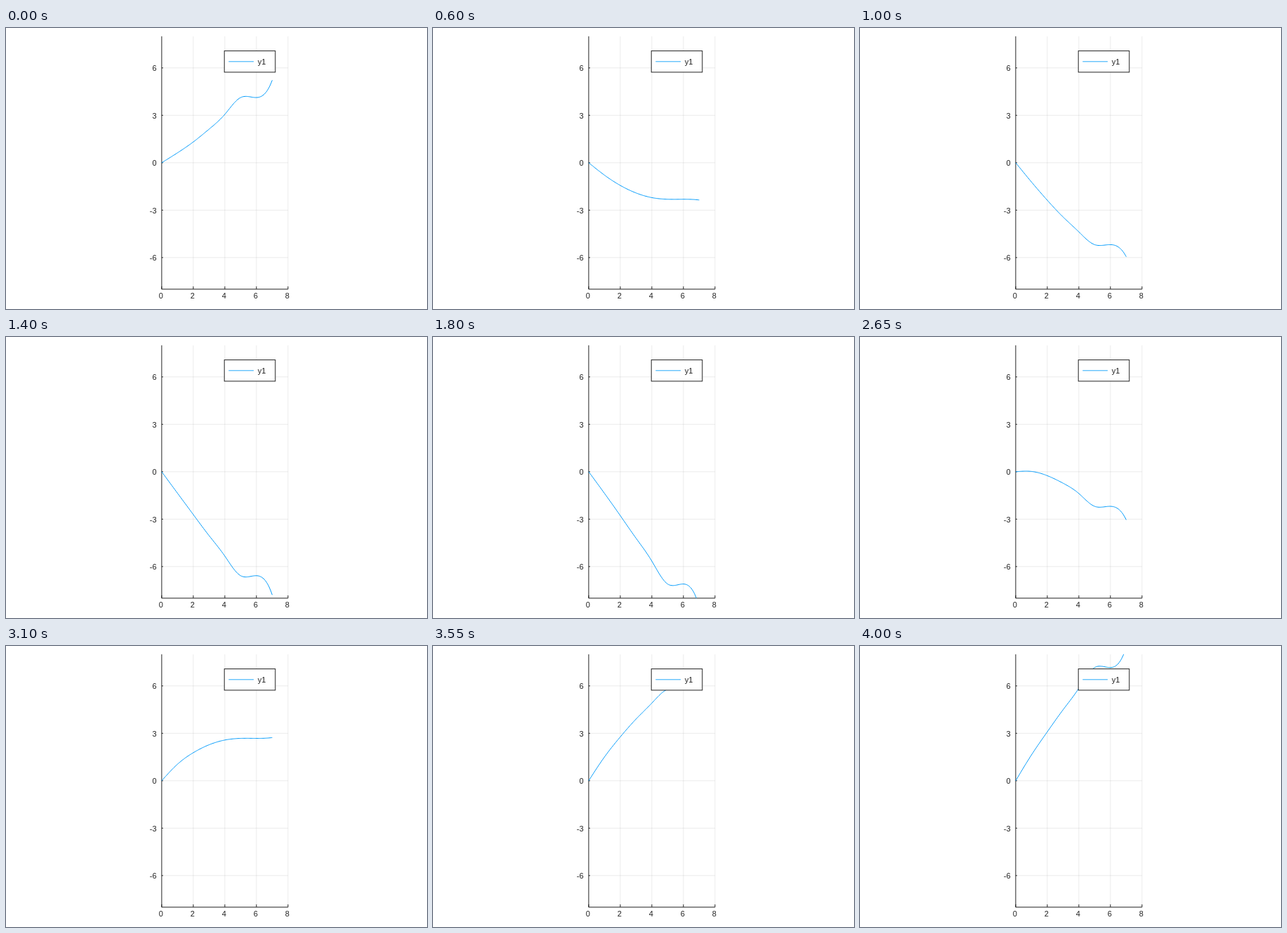
An HTML page that plays this animation: 600 by 400 pixels, repeating every 4050 ms.

```html
<!DOCTYPE html>
<html lang="en">
<head>
<meta charset="utf-8">
<title>Line plot</title>
<style>
  html, body { margin: 0; width: 100%; height: 100%; overflow: hidden; background: #fff; }
  svg { display: block; width: 600px; height: 400px; }
  text { font: 11px "Liberation Sans", Arial, sans-serif; fill: #222; }
  .grid { stroke: #000; stroke-opacity: .1; stroke-width: .8; }
  .axis { stroke: #222; stroke-width: 1; }
  .series { stroke: #009afa; stroke-width: 1; fill: none; stroke-linejoin: round; }
</style>
</head>
<body>
<svg viewBox="0 0 600 400">
  <clipPath id="area"><rect x="221" y="11.8" width="181" height="360"/></clipPath>
  <g id="grid"></g>
  <g id="axes"></g>
  <path id="curve" class="series" clip-path="url(#area)"/>
  <rect x="311.2" y="32.6" width="72.6" height="30.3" fill="#fff" class="axis"/>
  <path d="M317.3 47.8H353" class="series" stroke-opacity=".85"/>
  <text x="358.8" y="52">y1</text>
</svg>
<script>
const LOOP = 4050, STEP = 50, UNIT = 22.5;
const LEFT = 221.9, MIDDLE = 191.8, REACH = 8 * UNIT;
const LINKS = 7, SAMPLES = 140, OMEGA = 2 * Math.PI / 5;
const px = x => LEFT + UNIT * x;
const py = y => MIDDLE - UNIT * y;

// Rise of link k: a swing that runs outwards, its third harmonic,
// and a small bias that fades away from the root
function rise(k, t) {
  const root = .3 ** (k - 1);
  const swing = (1.5 + .14 * root) * Math.sin(OMEGA * (t - .12 - .091 * k));
  const ripple = .18 * .83 ** k * Math.cos(3 * OMEGA * t - 1.83 - .21 * k);
  return .13 * root - swing - ripple;
}

// Node heights; the sixth link stays level and the last follows the fifth
function heights(t) {
  const ys = [0];
  for (let k = 1; k <= LINKS; k++)
    ys.push(ys[k - 1] + (k === 6 ? 0 : rise(Math.min(k, 5.3), t)));
  return ys;
}

// Cubic spline on unit steps: natural at the start, not-a-knot at the end
function spline(ys) {
  const n = ys.length - 1;
  const bend = Array(n + 1).fill(0);
  const second = i => ys[i - 1] - 2 * ys[i] + ys[i + 1];
  bend[n - 1] = second(n - 1);
  for (let pass = 0; pass < 20; pass++)
    for (let i = 1; i < n - 1; i++)
      bend[i] = (6 * second(i) - bend[i - 1] - bend[i + 1]) / 4;
  bend[n] = 2 * bend[n - 1] - bend[n - 2];
  return x => {
    const i = Math.min(Math.floor(x), n - 1), b = x - i, a = 1 - b;
    return a * ys[i] + b * ys[i + 1]
      + ((a ** 3 - a) * bend[i] + (b ** 3 - b) * bend[i + 1]) / 6;
  };
}

function render(ms) {
  const t = Math.floor(ms % LOOP / STEP) * STEP / 1000;
  const shape = spline(heights(t));
  const points = Array.from({ length: SAMPLES + 1 }, (_, i) => {
    const x = LINKS * i / SAMPLES;
    return px(x).toFixed(2) + " " + py(shape(x)).toFixed(2);
  });
  document.getElementById("curve").setAttribute("d", "M" + points.join("L"));
}

function drawPlot() {
  const top = MIDDLE - REACH, bottom = MIDDLE + REACH;
  const line = (cls, d) => `<path class="${cls}" d="${d}"/>`;
  const label = (x, y, anchor, s) => `<text x="${x}" y="${y}" text-anchor="${anchor}">${s}</text>`;
  let grid = "";
  let axes = line("axis", `M${LEFT} ${top}V${bottom}`) + line("axis", `M${LEFT} ${bottom}h${REACH}`);
  for (let x = 0; x <= 8; x += 2) {
    if (x) grid += line("grid", `M${px(x)} ${top}V${bottom}`);
    axes += line("axis", `M${px(x)} ${bottom}v-4`) + label(px(x) - 1.1, 385, "middle", x);
  }
  for (let y = -6; y <= 6; y += 3) {
    grid += line("grid", `M${LEFT} ${py(y)}h${REACH}`);
    axes += line("axis", `M${LEFT} ${py(y)}h2`) + label(214.6, py(y) + 4.2, "end", y);
  }
  document.getElementById("grid").innerHTML = grid;
  document.getElementById("axes").innerHTML = axes;
}

drawPlot();
render(0);
const start = performance.now();
(function tick() {
  render(performance.now() - start);
  requestAnimationFrame(tick);
})();
</script>
</body>
</html>
```
